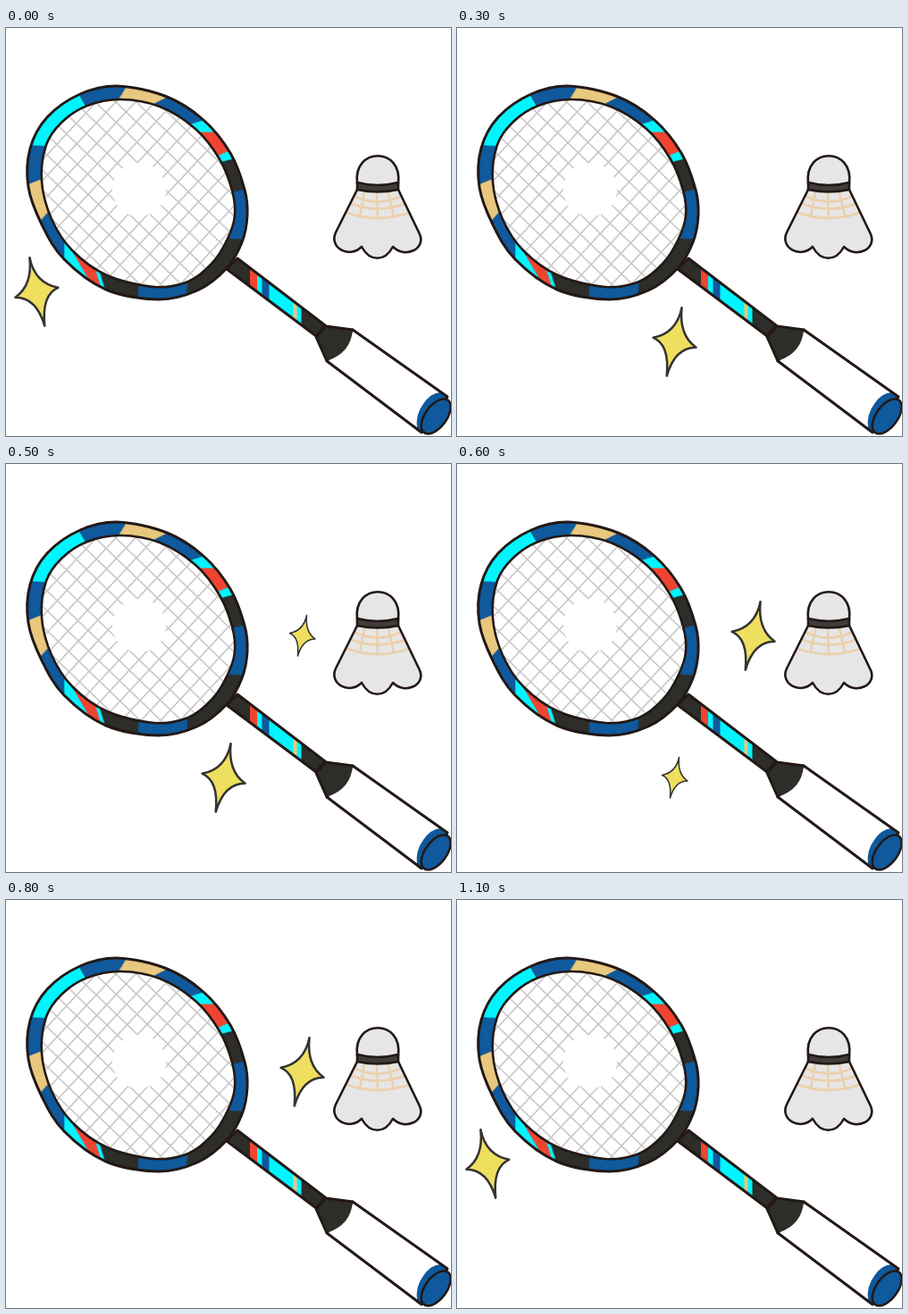
An HTML page with a canvas that plays this animation: 498x457 px, repeating every 1.2 s.

```html
<!DOCTYPE html>
<html lang="en">
<head>
<meta charset="utf-8">
<title>Badminton</title>
<style>
html, body { margin: 0; width: 100%; height: 100%; overflow: hidden; background: #fff; }
canvas { display: block; }
</style>
</head>
<body>
<canvas id="stage" width="498" height="457"></canvas>
<script>
const ctx = document.getElementById('stage').getContext('2d');
const INK = '#231815', DARK = '#2d2d29', BLUE = '#0f599c', CYAN = '#00f5ff',
  TAN = '#e8c77e', RED = '#f04431', GREY = '#e6e6e6', YELLOW = '#efdf5f', CREAM = '#ebd0ab';

// Closed smooth curve through the points of a flat x, y list.
function loop(xy) {
  const n = xy.length / 2, path = new Path2D();
  const at = i => { const j = (i + n) % n * 2; return [xy[j], xy[j + 1]]; };
  path.moveTo(...at(0));
  for (let i = 0; i < n; i++) {
    const [a, b, c, d] = [at(i - 1), at(i), at(i + 1), at(i + 2)];
    path.bezierCurveTo(b[0] + (c[0] - a[0]) / 6, b[1] + (c[1] - a[1]) / 6,
      c[0] - (d[0] - b[0]) / 6, c[1] - (d[1] - b[1]) / 6, ...c);
  }
  return path;
}

function paint(shape, fill, stroke, width = 3) {
  const path = typeof shape === 'string' ? new Path2D(shape) : shape;
  if (fill) { ctx.fillStyle = fill; ctx.fill(path); }
  if (stroke) { ctx.strokeStyle = stroke; ctx.lineWidth = width; ctx.stroke(path); }
}

function clipped(path, draw, rule = 'nonzero') {
  ctx.save();
  ctx.clip(path, rule);
  draw();
  ctx.restore();
}

const rim = loop([83, 74, 125, 65, 180, 77, 221, 103, 251, 140, 267, 181, 270, 210, 264, 240,
  247, 269, 214, 294, 170, 304, 112, 293, 65, 259, 40, 220, 25, 178, 27, 135, 46, 100]);
const hole = loop([91, 87, 128, 80, 172, 88, 212, 113, 239, 147, 253, 182, 256, 210, 248, 236,
  231, 263, 204, 284, 166, 290, 113, 277, 74, 249, 51, 214, 40, 172, 45, 131, 63, 105]);
const frame = new Path2D(rim);
frame.addPath(hole);
const shaft = new Path2D('M259 258L357 333L347 345L247 270Z');

// Edges between colours on the head: outer x, y, inner x, y, colour that follows clockwise.
const rimBands = [
  [82, 76, 89, 88, BLUE], [135, 66, 127, 79, TAN], [180, 78, 164, 86, BLUE],
  [220, 104, 207, 108, CYAN], [230, 117, 218, 117, RED], [250, 138, 238, 143, CYAN],
  [254, 147, 243, 150, DARK], [266, 181, 254, 184, BLUE], [265, 237, 248, 236, DARK],
  [202, 300, 203, 286, BLUE], [147, 303, 148, 289, DARK], [110, 291, 105, 275, CYAN],
  [105, 288, 100, 272, RED], [92, 281, 79, 259, CYAN], [65, 257, 65, 240, BLUE],
  [37, 217, 46, 207, TAN], [24, 175, 39, 169, BLUE], [31, 131, 46, 132, CYAN]
];
// Left edge and colour of each shaft band.
const shaftBands = [[273, RED], [281, CYAN], [286.5, BLUE], [294.5, CYAN], [321.5, TAN], [325.5, CYAN], [330.5, DARK]];

// Quad between two edges, lengthened past both sides of the ring.
function bandPath(a, b) {
  const beyond = ([x, y, u, v], by) => {
    const k = by / Math.hypot(x - u, y - v);
    return [x + (x - u) * k, y + (y - v) * k];
  };
  const inward = ([x, y, u, v]) => beyond([u, v, x, y], 6);
  return `M${beyond(a, 25)}L${beyond(b, 25)}L${inward(b)}L${inward(a)}Z`;
}

function drawNet() {
  for (const angle of [44, -47]) {
    ctx.save();
    ctx.translate(148, 185);
    ctx.rotate(angle * Math.PI / 180);
    for (let y = -136; y < 140; y += 16) paint(`M-150 ${y}H150`, null, '#cacaca', 1.7);
    ctx.restore();
  }
  ctx.fillStyle = '#fff';
  ctx.beginPath();
  ctx.arc(149, 181, 30, 0, 7);
  ctx.fill();
}

function drawRacket() {
  clipped(hole, drawNet);

  paint(shaft, DARK);
  clipped(shaft, () => shaftBands.forEach(([x, color]) =>
    paint(`M${x} 250H400V370H${x}Z`, color)));
  paint(shaft, null, INK);

  clipped(frame, () => {
    paint(rim, DARK);
    rimBands.forEach((a, i) => {
      const b = rimBands[(i + 1) % rimBands.length];
      paint(bandPath(a, b), a[4], a[4], 0.5);
    });
  }, 'evenodd');
  paint(rim, null, INK);
  paint(hole, null, INK, 2.6);

  const grip = 'M388 338L494 413L465 453L359 373Z';
  paint(grip, '#fff');
  paint('M486 408Q475 409 467 421Q458 433 460 448L466 454L495 416Z', BLUE);
  paint(grip, null, INK);
  paint('M347 346L358 334L388 338Q386 364 359 373Z', DARK);
  paint('M388 338L358 334L347 346L359 373', null, INK);

  const cap = new Path2D();
  cap.ellipse(481.2, 435, 22.5, 12, -0.94, 0, 7);
  paint(cap, BLUE, INK, 2.6);
}

function drawShuttle() {
  const skirt = new Path2D('M393 181L369 229C361 246 384 259 398 245C407 262 424 262 433 245' +
    'C447 259 470 247 463 231L439 181Z');
  paint(skirt, GREY);
  clipped(skirt, () => paint('M389 188Q416 201 443 188M387 197Q416 208 446 197M382 207Q416 219 451 207' +
    'M401 184L396 211M415 184L416 213M428 184L434 211', null, CREAM, 2.6));
  paint(skirt, null, INK, 2.6);
  paint('M393 174C388 133 444 133 439 174Q416 180 393 174Z', GREY, INK, 2.6);
  paint('M393 173Q416 179 439 173V181Q416 186 393 181Z', '#403c3b', INK, 2.6);
}

const star = new Path2D('M9-45Q5-8 28 8Q0 8-11 46Q-7 4-29-5Q2-11 9-45Z');
const pulse = [.15, .5, .84, 1, .84, .5, .15];
// Centre, mirroring, first step and sizes of each sparkle.
const sparkles = [
  { x: 34, y: 295, flip: -1, start: 9, sizes: [.15, .5, .84, .84, .5, .15] },
  { x: 244, y: 351, flip: 1, start: 1, sizes: pulse },
  { x: 332, y: 192, flip: 1, start: 4, sizes: pulse }
];

function drawSparkle({ x, y, flip, start, sizes }, step) {
  const size = sizes[(step - start + 12) % 12];
  if (!size) return;
  ctx.save();
  ctx.translate(x, y);
  ctx.scale(size * flip, size);
  paint(star, YELLOW, '#333', 3);
  ctx.restore();
}

function render() {
  const step = Math.floor(performance.now() % 1200 / 100);
  ctx.lineJoin = ctx.lineCap = 'round';
  ctx.fillStyle = '#fff';
  ctx.fillRect(0, 0, 498, 457);
  drawRacket();
  drawShuttle();
  sparkles.forEach(s => drawSparkle(s, step));
  requestAnimationFrame(render);
}
render();
</script>
</body>
</html>
```
